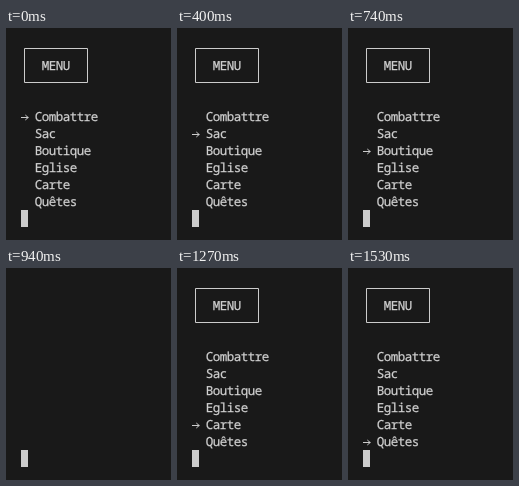
Animation of 165 by 212 pixels, one loop 1.93 s. Source, as an HTML page:

```html
<!DOCTYPE html>
<html lang="fr">
<head>
<meta charset="utf-8">
<title>Menu</title>
<style>
  html, body {
    margin: 0;
    width: 100%;
    height: 100%;
    overflow: hidden;
    background: #191919;
  }
  svg {
    display: block;
    width: 165px;
    height: 212px;
  }
  text {
    font: 12.5px "Noto Sans Mono", "DejaVu Sans Mono", monospace;
    letter-spacing: -0.5px;
    fill: #d0d0d0;
    stroke: #d0d0d0;
    stroke-width: 0.25px;
    text-rendering: geometricPrecision;
  }
  .line {
    fill: none;
    stroke: #ccc;
    stroke-width: 1;
    stroke-linejoin: round;
  }
  .cursor { fill: #ccc; }
  .menu { animation: redraw 1930ms step-end infinite; }
  .arrow { animation: select 1930ms step-end infinite; }

  /* The screen is cleared briefly before some redraws. */
  @keyframes redraw {
    0% { visibility: visible; }
    34.715% { visibility: hidden; }
    38.341% { visibility: visible; }
    48.704% { visibility: hidden; }
    52.331%, 100% { visibility: visible; }
  }
  /* One menu row is 17px high. */
  @keyframes select {
    0% { transform: translateY(0); }
    20.725% { transform: translateY(17px); }
    34.715% { transform: translateY(34px); }
    48.704% { transform: translateY(51px); }
    65.803% { transform: translateY(68px); }
    79.274%, 100% { transform: translateY(85px); }
  }
</style>
</head>
<body>
<svg viewBox="0 0 165 212">
  <g class="menu">
    <rect class="line" x="18.5" y="20.5" width="63" height="34"/>
    <text x="35.8" y="42">MENU</text>
    <text x="28.8" y="93">Combattre</text>
    <text x="28.8" y="110">Sac</text>
    <text x="28.8" y="127">Boutique</text>
    <text x="28.8" y="144">Eglise</text>
    <text x="28.8" y="161">Carte</text>
    <text x="28.8" y="178">Quêtes</text>
    <path class="line arrow" d="M15 89.5H22.5M19.3 87L22.2 89.5L19.3 92"/>
  </g>
  <rect class="cursor" x="15" y="182" width="7" height="17"/>
</svg>
</body>
</html>
```
